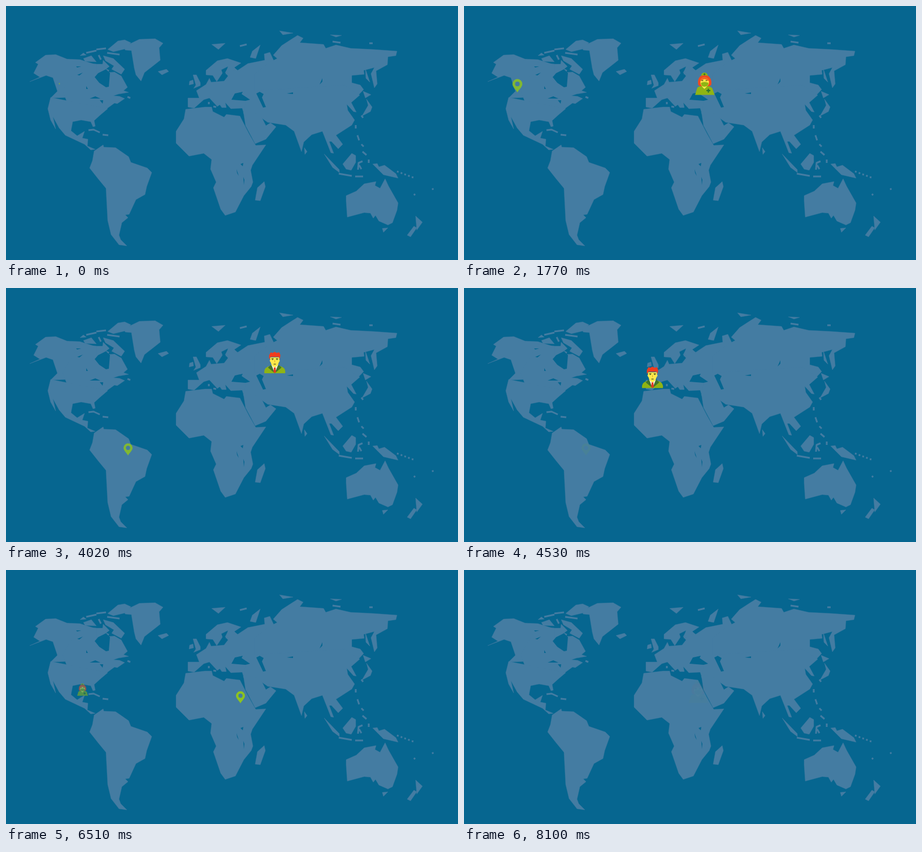
Animation, 800 px wide and 450 px high, one loop 8.16 s. Source, as an HTML page:

```html
<!DOCTYPE html>
<html lang="en">
<head>
<meta charset="utf-8">
<title>World map</title>
<style>
html, body { margin: 0; width: 100%; height: 100%; overflow: hidden; background: #066690; }
svg { display: block; width: 800px; height: 450px; }
#land { fill: #447ca2; stroke: #447ca2; stroke-width: .4; stroke-linejoin: round; }
#land .thin { fill: none; stroke-width: 3; }
#water { fill: #066690; }
</style>
</head>
<body>
<svg viewBox="0 0 800 450">
<g id="land">
<!-- North America -->
<path d="M42 134L60 126 49 119 57 103 52 100 70 87 88 86 108 94 131 95 156 103 171 103 172 96 183 107 157 127 167 136 165 160 79 163 91 151 83 127 71 123Z"/>
<path d="M160 120L178 118 192 117 204 124 215 144 208 150 217 153 199 156 190 159 201 160 210 164 197 173 192 172 170 188 150 200 120 200 100 150 130 100 160 103Z"/>
<path d="M79 162L180 182 167 193 156 203 158 213 154 214 150 205 133 202 118 205 115 221 126 230 139 222 135 234 145 236 144 248 158 254 150 255 139 245 105 229 94 216 83 196 88 218 79 202 74 182Z"/>
<path class="thin" d="M146 220L155 219 166 224M171 228L181 229M215 161L220 163"/>
<!-- Arctic Canada -->
<path d="M172 88L190 93 210 112 204 121 187 112 191 106 176 97ZM180 77L198 62 210 60 221 65 211 76 190 81ZM137 93L151 88 160 99 140 98ZM131 88L137 83 142 87Z"/>
<path class="thin" d="M142 83L160 79M160 77L177 75M179 83L201 86M164 87L168 95M175 112L182 115"/>
<!-- Greenland, Iceland -->
<path d="M209 72L236 59 264 58 278 66 271 74 273 96 245 118 239 133 230 122 227 110 222 79 211 78ZM269 116L284 112 288 116 276 122Z"/>
<!-- South America -->
<path d="M156 257L172 246 173 250 194 251 217 267 221 277 250 287 258 295 249 320 246 334 230 343 218 369 211 370 216 375 205 384 200 406 203 414 214 425 200 423 186 405 180 380 177 323 163 306 148 287 153 274Z"/>
<!-- Africa -->
<path d="M318 183L352 179 364 179 366 187 386 197 390 192 414 195 430 226 442 247 460 246 436 282 433 291 437 312 434 320 421 336 406 365 388 371 380 360 367 322 372 312 362 289 364 272 350 261 324 266 301 243 301 222 315 200Z"/>
<path d="M457 311L459 320 450 345 441 344 445 322Z"/>
<!-- Europe -->
<path d="M322 163L342 163 337 150 354 139 360 128 363 135 386 133 393 124 388 118 396 103 410 114 428 102 458 96 457 85 467 82 474 97 500 100 500 190 420 187 418 181 398 182 388 171 390 180 382 180 368 160 381 173 374 178 360 163 350 166 333 181 322 179Z"/>
<path d="M354 122L354 114 374 97 392 93 416 101 404 109 408 113 389 121 393 107 381 113 383 119 373 134 366 123Z"/>
<path d="M332 146L336 140 331 122 337 122 344 136 344 141ZM324 140L325 133 331 131 332 138Z"/>
<path class="thin" d="M359 170V174M367 178L372 179"/>
<!-- Asia -->
<path d="M466 100L480 93 473 87 488 70 516 52 526 57 520 65 562 68 566 75 584 69 610 75 650 77 692 80 690 88 676 90 675 104 655 115 657 138 652 145 646 120 652 109 633 114 634 121 612 123 612 136 627 140 633 148 616 166 560 200 480 200 440 190 440 120Z"/>
<path d="M440 150L600 140 626 158 611 171 620 188 615 187 603 174 605 185 617 202 612 211 584 229 596 245 588 253 576 240 572 240 580 261 575 260 560 222 541 228 527 241 523 258 510 222 495 211 463 206 449 196 420 190 425 165Z"/>
<path d="M420 186L450 192 460 212 468 207 478 214 460 236 441 244 424 212Z"/>
<!-- Northern isles -->
<path d="M364 68L388 66 376 77ZM432 91L436 80 450 69 442 93ZM484 44L508 48 490 51ZM574 51L594 52 584 55Z"/>
<path class="thin" d="M414 71L426 68M578 63L592 65M643 66H649"/>
<!-- East Asian isles -->
<path d="M636 111L644 135 637 128ZM632 151L646 157 636 163ZM638 165L648 179 645 187 630 195 641 176ZM528 251L533 258 529 263ZM563 262L590 290 590 295 578 286ZM596 280L612 261 619 265 619 277 611 291 602 289Z"/>
<path class="thin" d="M629 194L632 198M619 211V217M622 229L625 238M629 245L633 249M631 258L638 264M589 297L612 301M618 302L632 302M623 290L624 278 631 275M625 282L629 289M642 272V278"/>
<!-- Oceania -->
<path d="M649 280L657 279 660 285 670 282 690 297 694 305 668 299ZM666 394L676 393 668 401ZM725 372L737 383 727 397ZM722 390L727 393 716 409 710 406Z"/>
<path d="M602 345L602 336 620 328 634 315 655 311 653 318 662 323 671 306 677 319 694 349 692 362 684 384 676 388 660 381 654 371 650 376 645 367 634 366 604 374Z"/>
<path class="thin" stroke-dasharray="3 4" d="M692 293L721 304M722 333L726 337M754 325L760 322"/>
</g>
<g id="water">
<path d="M157 126L163 119 177 112 184 119 182 143 177 144 165 136ZM148 164L158 160 167 164ZM166 167H172L171 173ZM124 107H133L126 109ZM126 122L136 118 130 123ZM142 142L145 147H142Z"/>
<path d="M399 166L405 155 419 152 417 156 432 166 424 168ZM443 155L449 152 456 156 453 162 460 179 455 180ZM497 155L508 153V156ZM555 139L560 128V134ZM415 280L420 278 419 284ZM408 289L412 301 409 296ZM420 303L422 308 421 317Z"/>
</g>
<defs>
<path id="pin" fill="#8cc320" fill-rule="evenodd" d="M0 0C-2-4-8-9-8-13.5A8 8 0 1 1 8-13.5C8-9 2-4 0 0ZM-3.7-13.5a3.7 3.7 0 1 0 7.4 0a3.7 3.7 0 1 0-7.4 0Z"/>
<g id="nurse">
<path fill="#ef4a20" d="M-12 2C-14-9-9-16-1-16S13-9 11 2L8 4H-9Z"/>
<path fill="#8fb414" d="M-17.5 19.5L-14 8Q-13 5-8 4H6Q11 5 13 8L17 19.5Z"/>
<path fill="#ffe94a" d="M-8-5Q-1-12 7-5V-1Q6 3 3 4V5L-1 9-5 5V4Q-8 2-8-1Z"/>
<path fill="#f26a22" d="M-9-5Q-8-12-1-12T8-5Q3-6-1-9-4-6-9-5Z"/>
<path fill="#8fb414" d="M-7-2Q-1-5 6-2V1Q3 5-1 5T-7 1ZM-7-14.5Q-6-20-1-20T5-14.5Q-1-16-7-14.5Z"/>
<path fill="none" stroke="#3c6d24" stroke-width="1.3" d="M-6-5.5h3M1-5.5h3M-1-19v4M-3-17h4"/>
<path fill="none" stroke="#2f7430" stroke-width="2.2" d="M6 8.5v7M2.5 12h7"/>
</g>
<g id="clerk">
<path fill="#8fb414" d="M-18.5 19V15Q-18 9-9 6H9Q18 9 18.5 15V19Z"/>
<path fill="#41762c" d="M-8 5L-12 9 0 19 12 9 8 5Z"/>
<path fill="#f5f5e8" d="M-6 4L0 19 6 4Z"/>
<path fill="#e23820" d="M-2 9H2L1.5 11 2.5 16 0 19-2.5 16-1.5 11Z"/>
<path fill="#ffe94a" d="M-8-9H8V-5L9-3 7 0Q6 6 0 9-6 6-7 0L-9-3-8-5Z"/>
<path fill="#f03c1e" d="M-10-6V-13L-7-18-4-17 0-19 3-17 8-18 10-13 9-6 7-10H-7Z"/>
<path fill="none" stroke="#40521e" stroke-width="1.2" d="M-6-6.5h4M2-6.5h4M-5-5h2M3-5h2M-2 3h4"/>
<path fill="none" stroke="#d9a928" d="M0-4V0"/>
</g>
</defs>
<g id="stage"></g>
</svg>
<script>
const LOOP = 8160;
const stage = document.getElementById('stage');
const clamp = v => Math.max(0, Math.min(1, v));

function make(id) {
  const el = document.createElementNS('http://www.w3.org/2000/svg', 'use');
  el.setAttribute('href', '#' + id);
  stage.append(el);
  return el;
}

function place(el, x, y, scale, alpha) {
  el.setAttribute('transform', `translate(${x} ${y}) scale(${scale})`);
  el.setAttribute('opacity', alpha);
}

// Smooth curve through rows of [time, ...values]
function sample(keys, t) {
  const last = keys.length - 1;
  if (t <= keys[0][0]) return keys[0].slice(1);
  if (t >= keys[last][0]) return keys[last].slice(1);
  const i = keys.findIndex(k => k[0] > t) - 1;
  const a = keys[i], b = keys[i + 1], d = b[0] - a[0], u = (t - a[0]) / d;
  const slope = (n, c) => {
    const p = keys[Math.max(0, n - 1)], q = keys[Math.min(last, n + 1)];
    return (q[c] - p[c]) / (q[0] - p[0]) * d;
  };
  return a.slice(1).map((v, n) => {
    const c = n + 1, w = u * u * (3 - 2 * u);
    return v + (b[c] - v) * w + slope(i, c) * u * (1 - u) ** 2 - slope(i + 1, c) * u * u * (1 - u);
  });
}

// progress, scale, rise above the ground
const POP = [[0, .1, 14], [.07, .23, 13], [.4, .85, 11], [.7, 1.25, 7], [.88, 1.06, 1.5], [1, 1, 0]];

const pins = [
  { x: 94.5, y: 153, size: 1.1, seen: 0, start: 0, end: 850, fade: 1680 },
  { x: 216, y: 296.8, size: 1, seen: 2510, start: 2760, end: 3600, fade: 3930 },
  { x: 415, y: 236.3, size: 1, seen: 5400, start: 5400, end: 6360, fade: 6570 }
].map(p => ({ ...p, el: make('pin') }));

// time, x, y of the centre
const people = [
  { id: 'nurse', out: 2660, path: [[870, 646, 338], [1290, 566, 209], [1680, 463, 143], [1770, 427, 138], [2130, 250, 115], [2430, 94.5, 141.5]] },
  { id: 'clerk', out: 5085, path: [[3885, 523, 152], [4020, 476, 132], [4300, 400, 128], [4710, 287, 191], [5010, 239, 264], [5140, 221, 288]] },
  { id: 'nurse', out: 7650, path: [[6445, 118, 222], [6510, 135.5, 212], [6900, 248, 155], [7260, 341, 179], [7480, 415, 216]] }
].map(p => ({ ...p, el: make(p.id) }));

function draw(t) {
  for (const p of pins) {
    const [scale, rise] = sample(POP, (t - p.start) / (p.end - p.start));
    const alpha = t < p.seen ? 0 : 1 - clamp((t - p.fade) / 650);
    place(p.el, p.x, p.y - rise, scale * p.size, alpha);
  }
  for (const p of people) {
    const grow = clamp((t - p.path[0][0]) / 118);
    const [x, y] = sample(p.path, t);
    place(p.el, x, y, grow, grow * (1 - clamp((t - p.out) / 465)));
  }
}

const begin = performance.now();
function tick() {
  draw((performance.now() - begin) % LOOP);
  requestAnimationFrame(tick);
}
draw(0);
requestAnimationFrame(tick);
</script>
</body>
</html>
```
